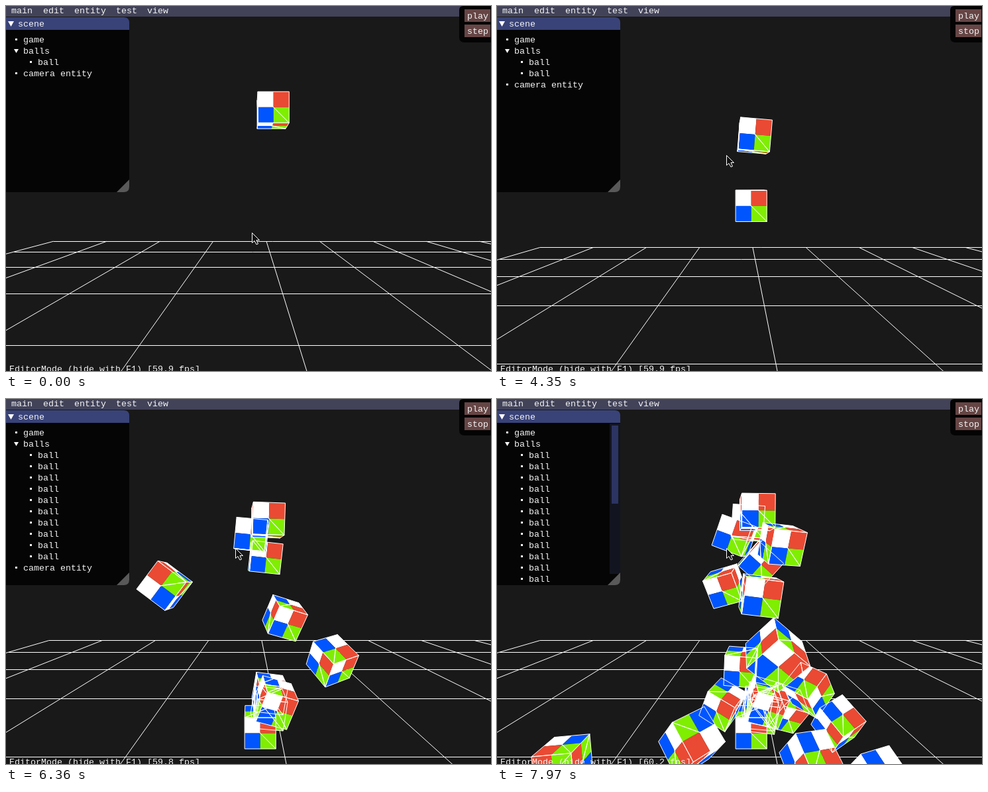
Write an HTML page with a canvas that moves like this. It is 732 by 551 pixels and loops after 8000 ms.

```html
<!DOCTYPE html>
<html lang="en">
<head>
<meta charset="utf-8">
<title>Editor with falling cubes</title>
<style>
html, body { margin: 0; width: 732px; height: 551px; overflow: hidden; background: #191919; }
canvas, svg { position: absolute; left: 0; top: 0; display: block; }
text { font: 13.33px "Liberation Mono", monospace; fill: #f4f4f4; white-space: pre; }
</style>
</head>
<body>
<canvas id="view" width="732" height="551"></canvas>
<svg width="732" height="551">
  <defs><clipPath id="list"><rect y="37" width="186" height="243"/></clipPath></defs>
  <text id="fps" x="5" y="552"></text>
  <rect width="732" height="16" fill="#424359"/>
  <g id="menu"></g>
  <path d="M0 17H178Q186 17 186 25V273Q186 281 178 281H0Z" fill="#050505"/>
  <path d="M0 17H178Q186 17 186 25V36H0Z" fill="#394378"/>
  <path d="M3 23H12L7.5 31Z" fill="#fff"/>
  <text x="18" y="31">scene</text>
  <g id="rows" clip-path="url(#list)"></g>
  <g id="scroll">
    <rect x="170" y="37" width="16" height="227" fill="#121520"/>
    <rect id="thumb" x="173" y="40" width="10" fill="#2c3462"/>
  </g>
  <path d="M186 262V273Q186 281 178 281H167Z" fill="#595959"/>
  <path d="M732 0H690Q684 0 684 6V47Q684 55 692 55H732Z" fill="#040404"/>
  <path d="M692 5H731V24H692ZM692 28H731V47H692Z" fill="#664545"/>
  <text x="696" y="19">play</text>
  <text id="step" x="696" y="42"></text>
  <path id="cursor" d="M.5 .5V15.500L4 12.500L7 18L9.500 17L7 11.500H11.500Z" fill="#111" stroke="#fff"/>
</svg>
<script>
const LOOP = 8000, PLAY = 3670;
const FOCAL = 482, CX = 368.5, CY = 275.9, EYE = 529, HALF = 0.1025;
const $ = id => document.getElementById(id);
const ctx = $('view').getContext('2d');
const mix = (a, b, f) => a + (b - a) * f;

// Keys are [time, ...values], joined by straight moves and held at both ends.
function at(keys, t) {
  const i = keys.findIndex(k => k[0] > t);
  if (i < 0) return keys[keys.length - 1].slice(1);
  if (!i) return keys[0].slice(1);
  const a = keys[i - 1], b = keys[i], f = (t - a[0]) / (b[0] - a[0]);
  return a.slice(1).map((v, n) => mix(v, b[n + 1], f));
}

// Sideways shift and lift of the camera relative to its final place
const camera = [[740, 42, 56], [1650, 30, 0], [2310, 0, 0]];
const pointer = [[740, 371, 342], [1670, 318, 365], [2310, 345, 200], [2710, 300, 92],
  [3190, 300, 92], [3500, 222, 110], [3950, 346, 225]];

function frameRate(t) {
  if (t > 7900) return '60.2';
  const slow = (t > 1600 && t < 2950) || (t > 5700 && t < 7300);
  return slow ? '59.8' : '59.9';
}

// The spawner speeds up: its pauses shrink towards 86 ms.
const born = i => PLAY + 86 * i + 2150 * (1 - 0.8 ** i);
function ballCount(t) {
  let n = 1;
  while (born(n) <= t) n++;
  return n;
}

// Distance fallen in floor cells: one cell per second after a soft start
function fallen(ms) {
  const s = Math.max(0, ms) / 1000, ramp = 0.15;
  return s - ramp * (1 - Math.exp(-s / ramp));
}

const place = (x, y, d) => [(x - CX) * d / FOCAL, (y - CY) * d / FOCAL, d];
const START_X = 383, START = place(START_X, 184, 2.2);

// Where each ball comes to rest: x, depth, roll, and y unless it reaches the floor
const balls = [
  [383, 2.2, 0], [405, 2.05, 20, 457], [396, 2.25, 8, 466], [398, 2.35, 10, 472],
  [514, 2.05, 10, 489], [434, 2.2, 30, 466], [101, 1.75, -95], [400, 2.3, 14, 460],
  [341, 2.2, 20, 460], [575, 1.6, 20], [475, 1.7, 25], [285, 1.6, 35],
  [482, 2.05, -30], [366, 2.2, 3], [421, 1.55, 45, 385], [345, 2.2, -20, 282],
  [397, 1.85, 8, 296], [397, 2.15, 42, 248], [429, 1.95, 9, 219], [360, 2.1, 20, 207],
  [379, 2.15, 4, 188], [392, 2.05, 0, 172],
].map(([x, d, roll, y]) => {
  const end = place(x, y || 0, d);
  if (!y) end[1] = EYE / FOCAL - HALF;
  // Balls pushed aside tumble more.
  const tilt = 38 * Math.sin((x - START_X) / 90);
  return { end, angles: [Math.abs(tilt), tilt, roll] };
});

function pose({ end, angles }, i, t) {
  const f = Math.min(1, fallen(t - born(i)) / Math.abs(end[1] - START[1]));
  const p = Math.sqrt(f);
  return {
    pos: START.map((v, k) => mix(v, end[k], k === 1 ? f : p)),
    angles: angles.map(a => a * p * Math.PI / 180),
  };
}

// Each face: outward normal, then the axes along its texture
const X = [1, 0, 0], Y = [0, 1, 0], Z = [0, 0, 1], neg = v => v.map(n => -n);
const faces = [[neg(Z), X, Y], [Z, X, Y], [neg(Y), neg(Z), neg(X)], [Y, X, Z], [X, neg(Z), Y], [neg(X), neg(Z), Y]];
const tiles = [[-1, -1, '#fff'], [0, -1, '#ea4a33'], [-1, 0, '#0055ff'], [0, 0, '#7fee00']];

function turn([x, y, z], [pitch, yaw, roll]) {
  const spin = (a, b, r) => [a * Math.cos(r) - b * Math.sin(r), a * Math.sin(r) + b * Math.cos(r)];
  [x, z] = spin(x, z, yaw);
  [y, z] = spin(y, z, pitch);
  [x, y] = spin(x, y, roll);
  return [x, y, z];
}

function trace(points) {
  ctx.beginPath();
  points.forEach(p => ctx.lineTo(...p));
  ctx.closePath();
}

function drawFloor(shift, lift) {
  const px = (i, d) => CX + (FOCAL * (i + 0.218) + shift) / d;
  const py = d => CY + (EYE - lift) / d;
  ctx.beginPath();
  for (let d = 1; d <= 6; d++) {
    const y = Math.round(py(d)) + 0.5;
    ctx.moveTo(px(-4, d), y);
    ctx.lineTo(px(6, d), y);
  }
  for (let i = -4; i <= 6; i++) {
    ctx.moveTo(px(i, 6), py(6) + 0.5);
    ctx.lineTo(px(i, 0.5), py(0.5));
  }
  ctx.stroke();
}

function drawCubes(t, shift, lift) {
  const wires = [];
  const live = balls.slice(0, ballCount(t)).map((b, i) => pose(b, i, t));
  live.sort((a, b) => b.pos[2] - a.pos[2]);
  for (const { pos, angles } of live) {
    const eye = [pos[0] + shift / FOCAL, pos[1] - lift / FOCAL, pos[2]];
    for (const [n, u, v] of faces) {
      const facing = turn(n, angles).reduce((sum, k, i) => sum + k * eye[i], HALF);
      if (facing >= 0) continue;
      const point = (a, b) => {
        const corner = turn(n.map((k, i) => k + u[i] * a + v[i] * b), angles);
        const [x, y, z] = corner.map((k, i) => k * HALF + eye[i]);
        return [CX + FOCAL * x / z, CY + FOCAL * y / z];
      };
      const quad = (a, b, s) => [point(a, b), point(a + s, b), point(a + s, b + s), point(a, b + s)];
      for (const [a, b, color] of tiles) {
        trace(quad(a, b, 1));
        ctx.fillStyle = color;
        ctx.fill();
      }
      const [A, B, C, D] = quad(-1, -1, 2);
      wires.push([A, B, C], [A, C, D]);
    }
  }
  // Wires stay visible through nearer cubes.
  for (const w of wires) {
    trace(w);
    ctx.stroke();
  }
}

let shown = 0;
function drawList(count) {
  if (count === shown) return;
  shown = count;
  let y = 51;
  const row = (label, x = 26, open = false) => {
    const mark = open ? `M12 ${y - 3}h7l-3.500 6z` : `M${x - 12} ${y - 2}h3v3h-3z`;
    const html = `<path d="${mark}" fill="#fff"/><text x="${x}" y="${y + 4}">${label}</text>`;
    y += 17;
    return html;
  };
  let html = row('game') + row('balls', 26, true);
  for (let i = 0; i < count; i++) html += row('ball', 48);
  $('rows').innerHTML = html + row('camera entity');
  $('scroll').style.display = count > 12 ? '' : 'none';
  $('thumb').setAttribute('height', Math.ceil(3440 / (count + 3.3)));
}

function render(t) {
  const [shift, lift] = at(camera, t);
  ctx.fillStyle = '#191919';
  ctx.fillRect(0, 0, 732, 551);
  ctx.strokeStyle = '#fff';
  ctx.lineWidth = 1;
  ctx.lineJoin = 'round';
  drawFloor(shift, lift);
  drawCubes(t, shift, lift);
  drawList(ballCount(t));
  $('fps').textContent = `EditorMode (hide with F1) [${frameRate(t)} fps]`;
  $('step').textContent = t < PLAY ? 'step' : 'stop';
  $('cursor').setAttribute('transform', `translate(${at(pointer, t).map(Math.round)})`);
}

$('menu').innerHTML = [[8, 'main'], [56, 'edit'], [103, 'entity'], [166, 'test'], [213, 'view']]
  .map(([x, s]) => `<text x="${x}" y="11">${s}</text>`).join('');

const start = performance.now();
function tick() {
  render((performance.now() - start) % LOOP);
  requestAnimationFrame(tick);
}
tick();
</script>
</body>
</html>
```
